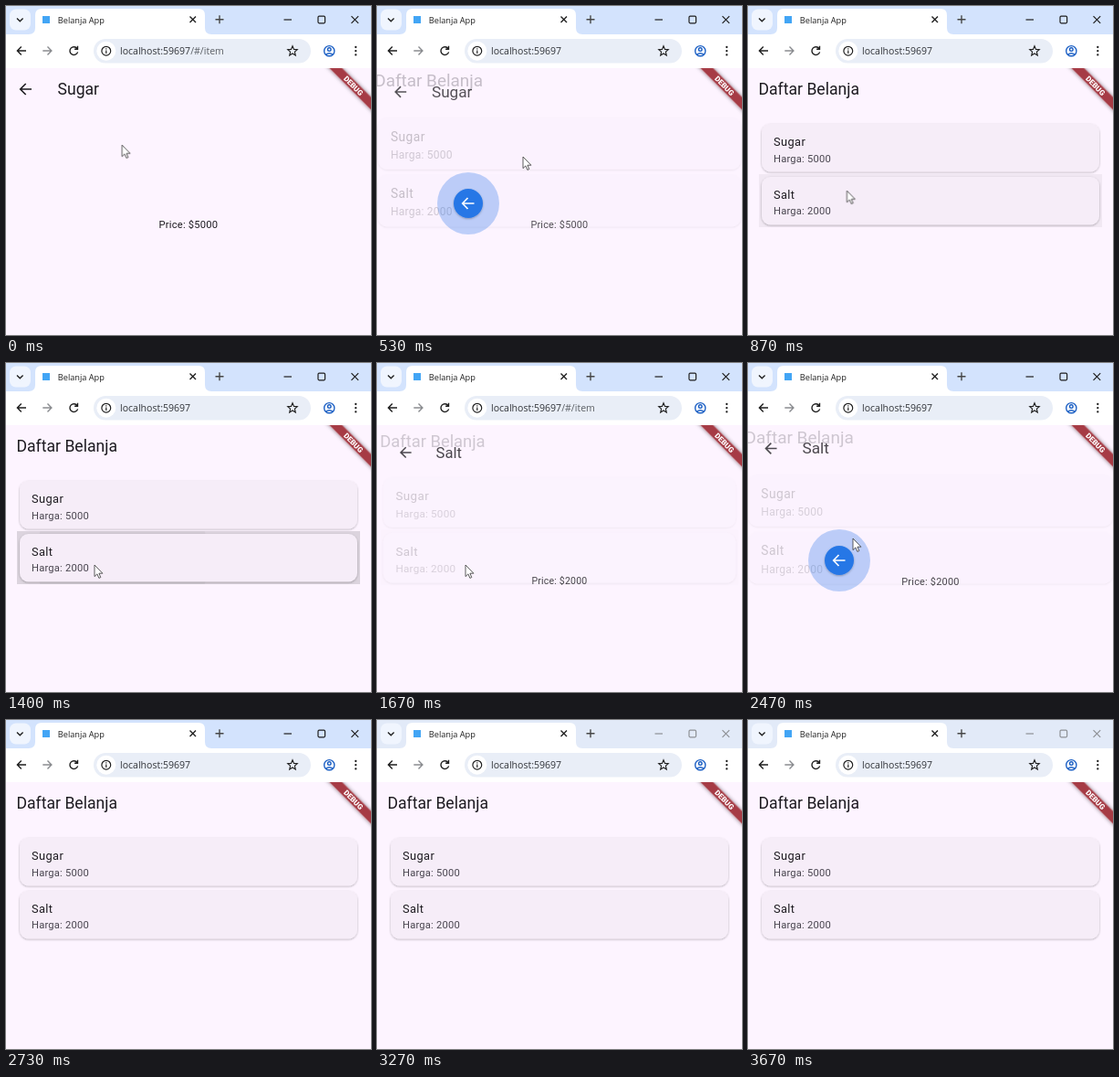
An HTML page for the animation above (3.74 s loop, 400x360 px).

```html
<!DOCTYPE html>
<html lang="en">
<head>
<meta charset="utf-8">
<title>Belanja App</title>
<style>
html, body { margin: 0; width: 100%; height: 100%; overflow: hidden; background: #fdf4ff; }
svg { display: block; width: 400px; height: 360px; }
.roboto { font-family: Roboto, sans-serif; fill: #1d1b20; }
.ui { font-family: "Open Sans", "Noto Sans", sans-serif; }
.h1 { font-size: 17.6px; }
.name { font-size: 12.8px; letter-spacing: .4px; }
.sub { font-size: 11.2px; letter-spacing: .2px; fill: #49454f; }
.price { font-size: 11.2px; letter-spacing: .2px; }
.line { fill: none; stroke: #1f1f1f; stroke-width: 1.4; }
.page { transform-origin: 200px 214px; }

.anim { animation: 3740ms linear infinite; }
.list { animation-name: list; }
.sugar { animation-name: sugar; }
.salt { animation-name: salt; }
.ink { animation-name: ink; }
.splash { animation-name: splash; }
.swipe { animation-name: swipe; }
.halo { animation-name: halo; }
.disc { animation-name: disc; }
.arrow { animation-name: arrow; }
.cursor { animation-name: cursor; }
.route { animation-name: route; animation-timing-function: step-end; }
.strip { animation-name: strip; animation-timing-function: step-end; }
.winbtn { animation-name: winbtn; animation-timing-function: step-end; }

@keyframes list {
  0%, 12.17% { transform: scale(1.1); animation-timing-function: cubic-bezier(.4,0,.2,1); }
  20.19%, 41.18% { transform: scale(1); }
  49.2%, 64.17% { transform: scale(1.1); animation-timing-function: cubic-bezier(.4,0,.2,1); }
  72.19%, 100% { transform: scale(1); }
}
@keyframes sugar {
  0%, 12.17% { transform: scale(1); opacity: 1; animation-timing-function: cubic-bezier(.4,0,.2,1); }
  20.19%, 100% { transform: scale(.9); opacity: 0; }
}
@keyframes salt {
  0%, 41.6% { transform: scale(.88); opacity: 0; }
  45.45% { transform: scale(.96); opacity: 1; animation-timing-function: ease-out; }
  49.2%, 64.17% { transform: scale(1); opacity: 1; animation-timing-function: cubic-bezier(.4,0,.2,1); }
  72.19%, 100% { transform: scale(.9); opacity: 0; }
}
@keyframes ink {
  0%, 21.1% { opacity: 0; }
  23.26% { opacity: .05; }
  25.4%, 33.4% { opacity: .08; }
  37.43%, 42% { opacity: .145; }
  45.5%, 100% { opacity: 0; }
}
@keyframes splash {
  0%, 33.9% { transform: translate(98px,222px) scale(8); opacity: 0; }
  34% { transform: translate(98px,222px) scale(8); opacity: .04; }
  37.43% { transform: translate(127px,213px) scale(94); opacity: .04; }
  42% { transform: translate(200px,213px) scale(190); opacity: .04; }
  45.5%, 100% { transform: translate(200px,213px) scale(190); opacity: 0; }
}
@keyframes swipe {
  0%, 1.87% { transform: translate(-22px,216px); opacity: 1; animation-timing-function: ease-out; }
  10.7%, 16.04% { transform: translate(100px,216px); opacity: 1; }
  20.3% { transform: translate(100px,216px); opacity: 0; }
  20.4%, 58.9% { transform: translate(-22px,216px); opacity: 1; animation-timing-function: ease-out; }
  62.8%, 66.3% { transform: translate(100px,216px); opacity: 1; }
  71.4% { transform: translate(100px,216px); opacity: 0; }
  71.5%, 100% { transform: translate(-22px,216px); opacity: 1; }
}
@keyframes halo {
  0%, 10.7% { transform: scale(0); }
  14.1%, 20.4% { transform: scale(1); }
  20.5%, 62.8% { transform: scale(0); }
  65%, 71.5% { transform: scale(1); }
  71.6%, 100% { transform: scale(0); }
}
@keyframes disc {
  0%, 10% { fill: #fff; }
  11%, 20.4% { fill: #2877e6; }
  20.5%, 62.3% { fill: #fff; }
  63%, 71.5% { fill: #2877e6; }
  71.6%, 100% { fill: #fff; }
}
@keyframes arrow {
  0%, 10% { stroke: #2877e6; }
  11%, 20.4% { stroke: #fff; }
  20.5%, 62.3% { stroke: #2877e6; }
  63%, 71.5% { stroke: #fff; }
  71.6%, 100% { stroke: #2877e6; }
}
@keyframes cursor {
  0% { transform: translate(127px,152px); animation-timing-function: ease-out; }
  9%, 15% { transform: translate(160px,165px); animation-timing-function: ease-in-out; }
  23.26% { transform: translate(108.5px,202px); animation-timing-function: ease-out; }
  30.2%, 46% { transform: translate(97px,221px); animation-timing-function: ease-in-out; }
  57%, 72.3% { transform: translate(115px,192px); opacity: 1; }
  72.4%, 100% { transform: translate(115px,192px); opacity: 0; }
}
@keyframes route {
  0% { opacity: 1; }
  12.3% { opacity: 0; }
  41.5% { opacity: 1; }
  64.3%, 100% { opacity: 0; }
}
@keyframes strip {
  0% { fill: #d3e3fd; }
  87.4%, 100% { fill: #e2eaf8; }
}
@keyframes winbtn {
  0% { stroke: #1f1f1f; }
  87.4%, 100% { stroke: #8e9196; }
}
</style>
</head>
<body>
<svg viewBox="0 0 400 360" xmlns="http://www.w3.org/2000/svg">
  <defs>
    <filter id="lift" x="-5%" y="-10%" width="110%" height="130%">
      <feDropShadow dx="0" dy=".9" stdDeviation=".8" flood-color="#000" flood-opacity=".3"/>
    </filter>
    <filter id="glow" x="-20%" y="-80%" width="140%" height="260%">
      <feDropShadow dx="0" dy="0" stdDeviation="2.2" flood-color="#000" flood-opacity=".5"/>
    </filter>
    <clipPath id="tile"><rect x="12" y="184" width="376" height="58"/></clipPath>
    <clipPath id="body"><rect y="68" width="400" height="292"/></clipPath>
    <path id="back" d="M28 91H16M21.7 85 15.7 91 21.7 97" fill="none" stroke="#1d1b20" stroke-width="1.6"/>
    <rect id="card" x="15" y="129" width="370" height="52.3" rx="9.6" fill="#f6edf8" filter="url(#lift)"/>
  </defs>

  <g clip-path="url(#body)">
    <rect y="68" width="400" height="292" fill="#fdf4ff"/>

    <g class="page anim list roboto">
      <text class="h1" x="11.5" y="97">Daftar Belanja</text>
      <g clip-path="url(#tile)">
        <rect class="anim ink" x="12" y="184" width="376" height="58"/>
        <circle class="anim splash" r="1"/>
      </g>
      <use href="#card"/>
      <use href="#card" y="58"/>
      <text class="name" x="28" y="153">Sugar</text>
      <text class="sub" x="28" y="170.7">Harga: 5000</text>
      <text class="name" x="28" y="210.7">Salt</text>
      <text class="sub" x="28" y="228.4">Harga: 2000</text>
    </g>

    <g class="page anim sugar roboto">
      <rect x="-40" y="30" width="480" height="370" fill="#fdf4ff"/>
      <use href="#back"/>
      <text class="h1" x="56.5" y="97">Sugar</text>
      <text class="price" x="167.6" y="243.3">Price: $5000</text>
    </g>

    <g class="page anim salt roboto">
      <rect x="-40" y="30" width="480" height="370" fill="#fdf4ff"/>
      <use href="#back"/>
      <text class="h1" x="56.5" y="97">Salt</text>
      <text class="price" x="167.6" y="243.3">Price: $2000</text>
    </g>

    <g transform="translate(400 68) rotate(45)">
      <rect x="-50" y="22.4" width="100" height="9.8" fill="#a63b45" filter="url(#glow)"/>
      <text class="roboto" x="0" y="30.2" text-anchor="middle" font-size="8.2" font-weight="900" style="fill:#fff">DEBUG</text>
    </g>

    <g class="anim swipe">
      <circle class="anim halo" r="34" fill="#1a6ee8" fill-opacity=".28"/>
      <circle class="anim disc" r="16" filter="url(#lift)"/>
      <path class="anim arrow" d="M6.5 0H-6M-.5-6-6.3 0-.5 6" fill="none" stroke-width="1.7"/>
    </g>
  </g>

  <rect class="anim strip" width="400" height="34"/>
  <rect x="4" y="3.5" width="23" height="23" rx="7" fill="#f0f5fe"/>
  <path class="line" d="M12 13.5 15.3 16.7 18.6 13.5"/>
  <path d="M25 31Q32 31 32 24V10Q32 3 39 3H211Q218 3 218 10V24Q218 31 225 31Z" fill="#fff"/>
  <rect x="40" y="11" width="8" height="8" fill="#42a5f5"/>
  <text class="ui" x="56.8" y="18.7" font-size="9.2" fill="#1f1f1f">Belanja App</text>
  <path class="line" d="M201.5 11.5 208 18M208 11.5 201.5 18"/>
  <path class="line" stroke-width="1.2" d="M229.5 14.8H238.5M234 10.3V19.3" style="stroke:#474747"/>
  <g class="anim winbtn" fill="none" stroke-width="1.2">
    <path d="M304.5 15H313"/>
    <rect x="342" y="11.2" width="7.6" height="7.6" rx="1.2"/>
    <path d="M378.5 11.2 386.2 18.9M386.2 11.2 378.5 18.9"/>
  </g>

  <rect y="31" width="400" height="37" fill="#fff"/>
  <path class="line" d="M22 49H12.6M16.8 44.6 12.4 49 16.8 53.4"/>
  <path class="line" d="M40.3 49H49.7M45.5 44.6 49.9 49 45.5 53.4" style="stroke:#8a8c90"/>
  <path class="line" d="M78 46.6A4.4 4.4 0 1 0 78.6 50.4M78.5 43.8V47.2H75.1"/>
  <rect x="96" y="36" width="238" height="26.5" rx="13.2" fill="#e9eef7"/>
  <circle cx="109.8" cy="49.2" r="10.5" fill="#fff"/>
  <circle class="line" cx="109.8" cy="49.2" r="4.9" style="stroke-width:1.2"/>
  <path class="line" d="M109.8 48.4V52M109.8 46.2V47.4" style="stroke-width:1.2"/>
  <text class="ui" x="125" y="53" font-size="10.55" fill="#33363b">localhost:59697<tspan id="route"></tspan></text>
  <text class="ui anim route" x="202.2" y="53" font-size="10.55" fill="#5c6066">/#/item</text>
  <path class="line" d="M314 43.8 315.5 47.4 319.3 47.7 316.4 50.2 317.3 54 314 52 310.7 54 311.6 50.2 308.7 47.7 312.5 47.4Z" style="stroke-width:1.1"/>
  <g fill="none" stroke="#1b5fc4" stroke-width="1.4">
    <circle cx="354.3" cy="49.2" r="5.6"/>
    <circle cx="354.3" cy="47.6" r="1.8"/>
    <path d="M350.4 53.2Q354.3 50.2 358.2 53.2"/>
  </g>
  <g fill="#1f1f1f">
    <circle cx="383.3" cy="45" r="1.15"/>
    <circle cx="383.3" cy="49.2" r="1.15"/>
    <circle cx="383.3" cy="53.4" r="1.15"/>
  </g>

  <path class="anim cursor" d="M0 0V12.6L2.9 9.9 4.9 14.4 6.8 13.5 4.9 9.2H8.9Z" fill="#fff" stroke="#333" stroke-width=".8" stroke-linejoin="round"/>
</svg>
</body>
</html>
```
